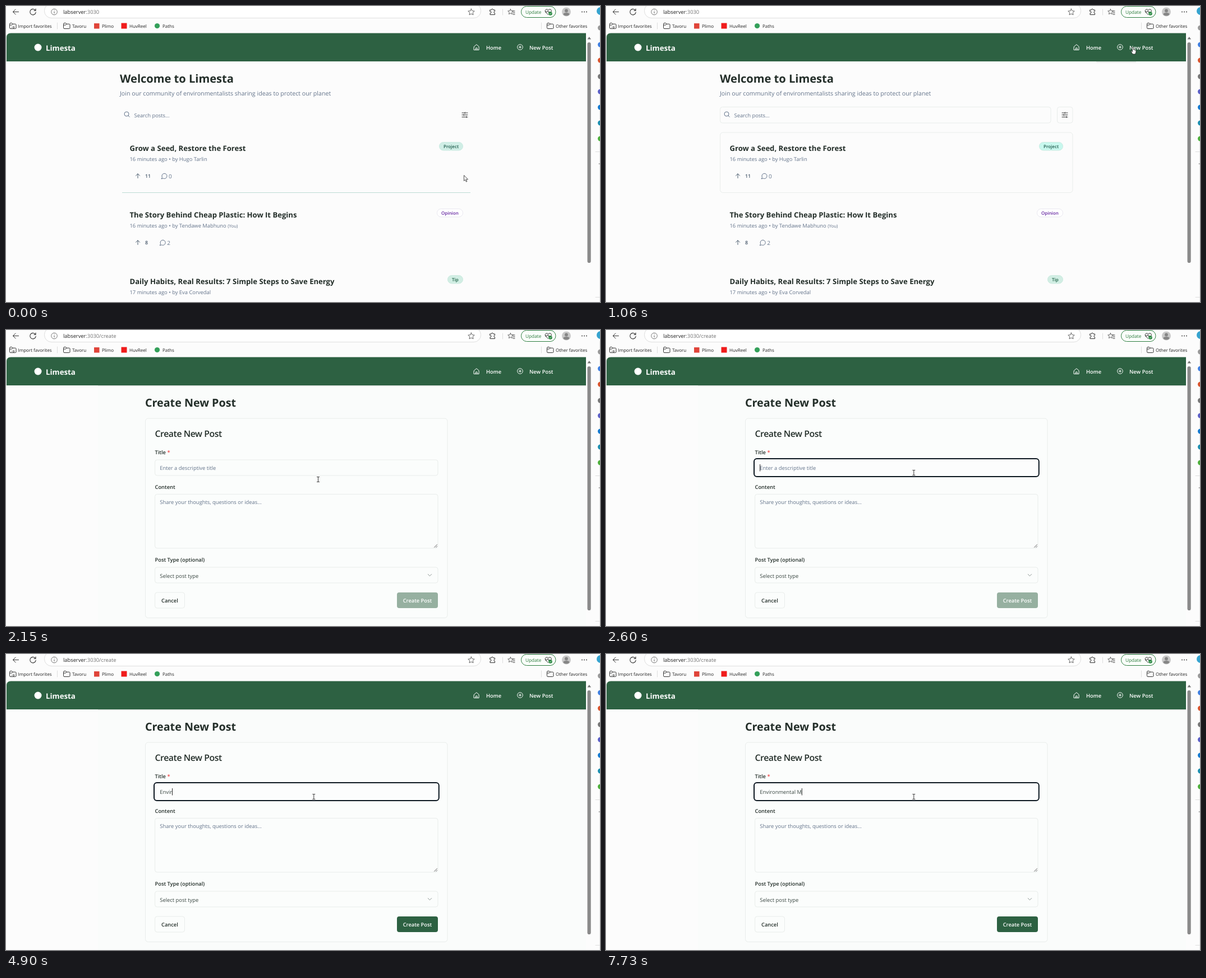
An HTML page that plays this animation: 1059x529 px, repeating every 8 s.

```html
<!DOCTYPE html>
<html lang="en">
<head>
<meta charset="utf-8">
<title>Community post form</title>
<style>
  html, body { margin: 0; width: 100%; height: 100%; overflow: hidden; background: #fcfcfc; }
  svg { display: block; width: 1059px; height: 529px; }
  text { font-family: "Open Sans", "Noto Sans", sans-serif; white-space: pre; text-rendering: geometricPrecision; }
</style>
</head>
<body>
<svg id="stage" viewBox="0 0 1059 529"></svg>
<script>
const GREEN = '#2d6142', INK = '#232e29', SLATE = '#64748b', EDGE = '#e9edeb', GREY = '#333';
const LOOP = 8000;

// Drawing helpers
const text = (x, y, size, str, fill = INK, weight = 400, extra = '') =>
  `<text x="${x}" y="${y}" font-size="${size}" fill="${fill}" font-weight="${weight}" ${extra}>${str}</text>`;
const box = (x, y, w, h, r, fill = 'none', stroke = 'none', extra = '') =>
  `<rect x="${x}" y="${y}" width="${w}" height="${h}" rx="${r}" fill="${fill}" stroke="${stroke}" ${extra}/>`;
const dot = (x, y, r, fill, stroke = 'none') =>
  `<circle cx="${x}" cy="${y}" r="${r}" fill="${fill}" stroke="${stroke}"/>`;
const line = (d, stroke = GREY, width = 1, fill = 'none') =>
  `<path d="${d}" fill="${fill}" stroke="${stroke}" stroke-width="${width}" stroke-linecap="round" stroke-linejoin="round"/>`;
const group = (id, body) => `<g id="${id}">${body}</g>`;

const folder = x => line(`M${x} 32q0-1.5 1.5-1.5h2.5l1.5 1.7h4.5q1.5 0 1.5 1.5v5.3q0 1.5-1.5 1.5h-8.5q-1.5 0-1.5-1.5zM${x} 34h4l1.5-1.8`);

function star(x, y, r) {
  const points = Array.from({ length: 10 }, (_, i) => {
    const a = (i / 5 - 0.5) * Math.PI, d = i % 2 ? r * 0.48 : r;
    return (x + d * Math.cos(a)).toFixed(2) + ' ' + (y + d * Math.sin(a)).toFixed(2);
  });
  return line('M' + points.join('L') + 'z', '#555', 0.9);
}

function browser() {
  const sideIcons = [[39, '#999'], [69, '#3f7fe0'], [97, '#d9532c'], [126, '#777'], [153, '#5b5fc7'],
    [181, '#1279d0'], [209, '#1b8fb0'], [237, '#4caf3a']];
  return box(0, 0, 1059, 529, 0, '#fcfcfc')
    + line('M22.5 10.5H12.5M17 6l-4.7 4.500 4.7 4.5')
    + line('M52.5 8a5.2 5.2 0 1 0 .7 3M53 5v3.2h-3.2', GREY, 1.1)
    + box(68.5, -4, 778, 25.5, 12.5, '#fff', '#dedede')
    + dot(86, 10.5, 5.3, 'none', '#777') + line('M86 10v3M86 7.7v.1', '#666')
    + `<text x="102" y="14" font-size="9.3" fill="#222">labserver<tspan fill="#707070">:3030<tspan id="path"></tspan></tspan></text>`
    + star(829.5, 11, 6)
    + line('M863 7h2.3a1.7 1.7 0 1 1 3.4 0h2.8v2.5a1.6 1.6 0 1 0 0 3.2V15.5H863v-2.6a1.7 1.7 0 1 0 0-3.3z')
    + line('M885.5 6v10', '#ddd')
    + star(899.5, 10.5, 5) + line('M903 9h4M904 12h3M904 15h3')
    + box(918.5, 0.5, 61.5, 20, 10, '#fbfefb', '#2c7d3f')
    + text(926, 14, 8.3, 'Update', '#2a7a3c')
    + line('M966.5 15.5l-4.5-4.5q-2-3 .5-4.7 2.5-1.3 4.3 1 2-2.3 4.5-1 2.3 1.7 .5 4.7M961.5 10.5h3l1.5-2 1.5 3 1-1.5')
    + dot(970.5, 13.5, 3.3, '#23853c') + line('M969 13.5l1.2 1.2 2-2.2', '#fff', 0.8)
    + dot(999, 10.5, 8, '#c9c9c9') + dot(999, 8.5, 2.9, '#858585')
    + `<path d="M993.5 15q0-3 5.5-3t5.5 3q-2 2.5-5.5 2.5t-5.5-2.5z" fill="#858585"/>`
    + [1027, 1031, 1035].map(x => dot(x, 10.5, 0.9, GREY)).join('')
    + dot(1060, 9, 7, '#35a3cf')
    // Bookmarks
    + folder(6.5) + line('M10 38h5m-2-2l2 2-2 2', GREY, 0.8) + text(21.5, 38.7, 8, 'Import favorites', '#222')
    + line('M91.5 30v11', '#ddd')
    + folder(102.5) + text(118, 38.7, 8, 'Tavoru', '#222')
    + box(157, 31, 9.5, 9.5, 0, '#e0453a') + text(171, 38.7, 8, 'Plimo', '#222')
    + box(205.5, 30.5, 10, 10, 0, '#f01c1c') + text(220, 38.7, 8, 'HuvReel', '#222')
    + dot(269.5, 35.5, 4.6, '#34a05a') + text(279, 38.7, 8, 'Paths', '#222')
    + line('M954.5 30v11', '#ddd')
    + folder(964.5) + text(980, 38.7, 8, 'Other favorites', '#222')
    // Side strip
    + box(1058, 20, 1, 509, 0, '#e9e9e9')
    + sideIcons.map(([y, c]) => dot(1059.5, y, 4.5, c)).join('')
    + line('M1051 260.5h8M1051 520.5h8', '#ddd') + line('M1057 282h3', '#777');
}

function header() {
  return `<path d="M1 99V56q0-7.5 7.5-7.5H1034V99z" fill="${GREEN}"/>`
    + dot(57, 74, 6.5, '#fff')
    + text(71, 79.7, 13.3, 'Limesta', '#fff', 700)
    + line('M834.5 72.5l4.3-3.7 4.3 3.7V78.5h-8.6zM837.5 78.5v-3.5h2.6v3.5', '#fff')
    + text(856, 78, 9.4, 'Home', '#fff', 600)
    + dot(916.5, 73.5, 4.8, 'none', '#fff') + line('M914.3 73.5h4.4M916.5 71.3v4.4', '#fff')
    + text(933, 78, 9.4, 'New Post', '#fff', 600)
    + `<path d="M1036.5 59.5l3.3-4.5 3.3 4.5z" fill="#777"/>`
    + box(1036.5, 65, 6.2, 394, 3.1, '#8a8a8a', 'none', 'id="thumb"');
}

function post(y, title, meta, votes, replies, badge) {
  const bubble = votes > 9 ? 281.8 : 279;
  const [x, label, fill, edge, ink, id] = badge;
  return text(220.5, y + 258.5, 13.1, title, INK, 700)
    + text(220.5, y + 276.6, 9.4, meta, SLATE)
    + line(`M235 ${y + 307.5}v-7.5M231.5 ${y + 303.3}l3.5-3.5 3.5 3.5`, '#47586b')
    + text(248, y + 307.3, 8.8, votes, '#47586b', 600)
    + line(`M${bubble - 3.5} ${y + 306}a4.6 4.6 0 1 1 2 2l-3 .8z`, SLATE)
    + text(bubble + 8.3, y + 307.5, 10, replies, SLATE)
    + box(x + 0.5, y + 243.5, 814 - x, 14.5, 7.2, fill, edge, `id="${id}"`)
    + text(x + 8, y + 254, 8, label, ink, 600);
}

function home() {
  return text(203, 137, 20.1, 'Welcome to Limesta', INK, 700)
    + text(203, 159.6, 10.65, 'Join our community of environmentalists sharing ideas to protect our planet', SLATE)
    + group('borders', box(203.5, 180.5, 589.5, 28.5, 4, 'none', EDGE) + box(804.5, 180.5, 27.5, 28.5, 4, 'none', EDGE)
      + box(203.5, 226, 628.5, 107.5, 5, 'none', EDGE) + box(874, 99, 71, 2.5, 0, '#e6e8e7'))
    + box(207, 333, 621, 1, 0, '#bcdcd4', 'none', 'id="hoverLine"')
    + dot(215, 193, 4, 'none', SLATE) + line('M218 196l2.3 2.3', SLATE)
    + text(228.5, 198.8, 9.4, 'Search posts...', SLATE)
    + line('M813 191h5M820 191h3M813 194.7h2.5M818 194.7h5M813 198.4h6M821.5 198.4h1.5M818.5 189.8v2.4M816.5 193.5v2.4M820.5 197.2v2.4')
    + post(0, 'Grow a Seed, Restore the Forest', '16 minutes ago • by Hugo Tarlin', 11, 0,
      [772, 'Project', '#d0eee6', '#cbebe2', '#1f5c4d', 'project'])
    + post(119, 'The Story Behind Cheap Plastic: How It Begins',
      '16 minutes ago • by Tendawe Mabhuno <tspan font-size="7.9">(You)</tspan>', 8, 2,
      [768, 'Opinion', '#fff', '#eae8f0', '#6424a0', 'opinion'])
    + post(238, 'Daily Habits, Real Results: 7 Simple Steps to Save Energy', '17 minutes ago • by Eva Corvedal', 5, 1,
      [787, 'Tip', '#d2eee4', '#cdebe0', '#1c6044', 'tip']);
}

function form() {
  return box(164, 99, 870, 430, 0, '#fafcfb') + box(164, 99, 870, 2, 0, '#e6e9e7')
    + text(248, 137, 19.7, 'Create New Post', INK, 700)
    + box(248.5, 158, 538.5, 356.5, 5, '#fbfdfc', EDGE)
    + text(265.5, 190.7, 15.8, 'Create New Post', INK, 600, 'letter-spacing="-.42"')
    + text(265.5, 222, 9.3, 'Title <tspan fill="#ef4444">*</tspan>', INK, 600)
    + box(265.5, 232, 504.5, 28, 4, '#fbfdfc', EDGE)
    + box(264, 230, 507.8, 32, 5, '#fcfdfd', '#0c1720', 'stroke-width="2" id="ring"')
    + text(274.3, 250, 9.4, '', SLATE, 400, 'id="entry"')
    + box(274, 240, 0.9, 12.5, 0, '#111', 'none', 'id="caret"')
    + text(265.5, 284, 9.3, 'Content', INK, 600)
    + box(265.5, 293.5, 504.5, 96.5, 4, '#fbfdfc', EDGE)
    + text(274.3, 311, 9.4, 'Share your thoughts, questions or ideas...', SLATE)
    + line('M763.5 388.5l5-5M766.5 388.5l2-2', '#555', 0.9)
    + text(265.5, 414.3, 9.3, 'Post Type (optional)', INK, 600)
    + box(265.5, 424, 504.5, 28, 4, '#fbfdfc', EDGE)
    + text(274.3, 442.5, 9.4, 'Select post type', '#3a4742')
    + line('M752.3 436.5l3.2 3.2 3.2-3.2', '#8a9490')
    + box(265.5, 469, 53, 28, 4, '#fbfdfc', EDGE) + text(277, 487.3, 9.3, 'Cancel', INK, 600)
    + box(697, 469, 73, 28, 4, '#96b0a0', 'none', 'id="submit"')
    + text(707.7, 487.3, 9.3, 'Create Post', '#fff', 600);
}

const pointers = {
  arrow: line('M0 0v9.5l2.2-2 1.7 3.7 1.5-.7-1.7-3.6h3z', '#222', 0.8, '#fff'),
  hand: line('M2.5 7V1.2q1-1.4 2 0V5q4.5 .3 4.5 2.5 0 3-1.5 5.5h-4.5L.3 8.5q.5-1.8 2.2 0z', '#222', 0.8, '#fff'),
  beam: line('M-2-4.5h1.5l.5 .6 .5-.6H2M0-4V4M-2 4.5h1.5l.5-.6 .5 .6H2', '#222', 0.9)
};

document.getElementById('stage').innerHTML =
  browser() + group('home', home()) + group('form', form()) + header()
  + group('pointer', Object.entries(pointers).map(([id, body]) => group(id, body)).join(''));

// Timelines: each entry holds until the next one starts
const moves = [
  [0, 816.5, 303, 'arrow'], [400, 823, 285, 'arrow'], [520, 852, 228, 'arrow'], [640, 896, 146, 'arrow'],
  [760, 924.5, 91, 'arrow'], [910, 936, 80, 'hand'], [1060, 936, 73, 'hand'], [1880, 781, 168, 'arrow'],
  [2030, 660, 214, 'arrow'], [2150, 556.5, 267, 'beam'], [2300, 548.8, 255, 'beam']
];
const TITLE = 'Environmental M';
const typed = [
  [0, 0], [3110, 1], [3520, 2], [3800, 3], [3920, 4], [4070, 5], [4350, 4], [4470, 3], [4620, 4], [4900, 5],
  [5300, 6], [5970, 7], [6230, 8], [6350, 9], [6600, 10], [6900, 11], [7180, 12], [7330, 13], [7450, 14], [7730, 15]
];
const at = (list, t) => list.findLast(entry => entry[0] <= t);
const el = id => document.getElementById(id);
const show = (id, on) => el(id).setAttribute('display', on ? 'inline' : 'none');

function render(t) {
  const creating = t >= 1480, focused = t >= 2600, left = t >= 520;
  show('home', !creating);
  show('form', creating);
  show('borders', left);
  show('hoverLine', !left);
  show('ring', focused);
  show('caret', focused);
  el('project').setAttribute('fill', left ? '#c8f8ee' : '#d0eee6');
  el('path').textContent = creating ? '/create' : '';
  el('thumb').setAttribute('height', creating ? 436 : 394);

  const count = at(typed, t)[1], entry = el('entry');
  entry.textContent = count ? TITLE.slice(0, count) : 'Enter a descriptive title';
  entry.setAttribute('fill', count ? '#3a4742' : SLATE);
  el('caret').setAttribute('x', 274.2 + (count ? entry.getComputedTextLength() : 0));
  el('submit').setAttribute('fill', t < 3110 ? '#96b0a0' : t < 3230 ? '#4a7659' : GREEN);

  const [, x, y, kind] = at(moves, t);
  el('pointer').setAttribute('transform', `translate(${x} ${y})`);
  for (const id in pointers) show(id, id === kind);
}

const start = performance.now();
function tick() {
  render((performance.now() - start) % LOOP);
  requestAnimationFrame(tick);
}
tick();
</script>
</body>
</html>
```
